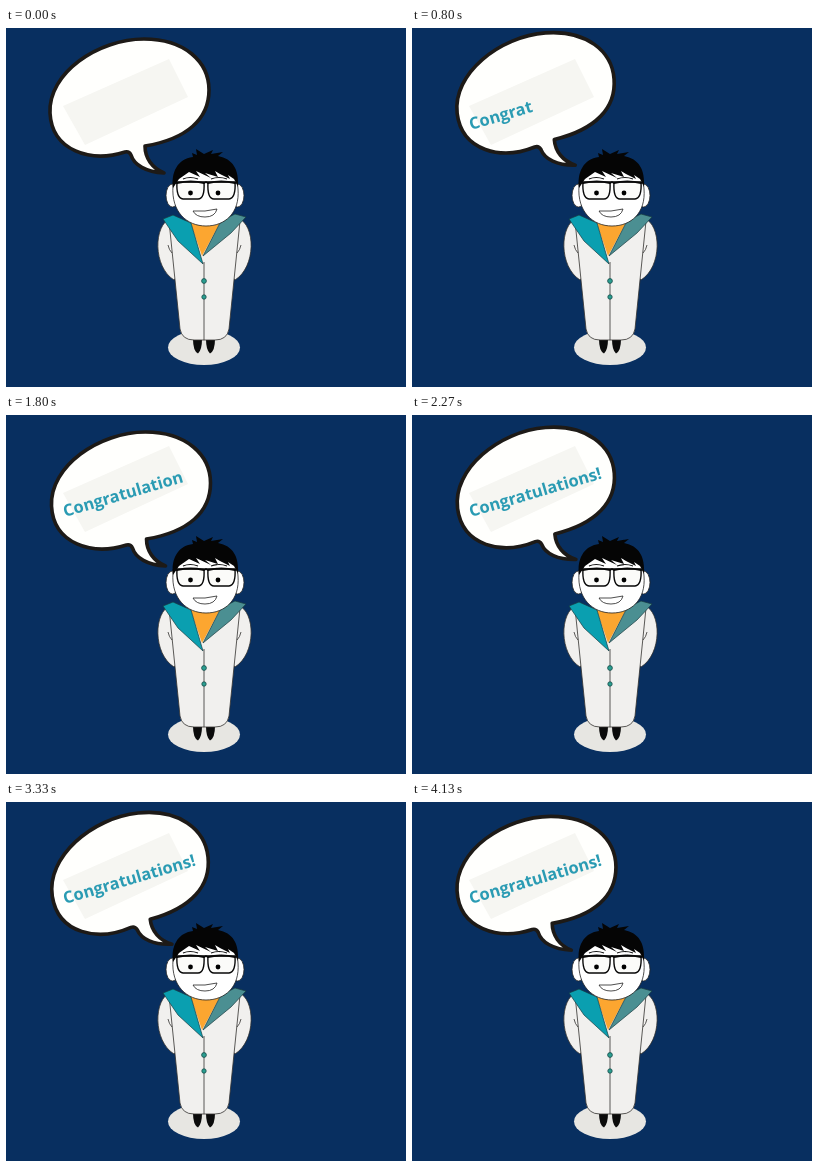
An HTML page for the animation above (4.19 s loop, 400 by 359 pixels).

```html
<!DOCTYPE html>
<html lang="en">
<head>
<meta charset="utf-8">
<title>Congratulations</title>
<style>
html, body { margin: 0; width: 100%; height: 100%; overflow: hidden; background: #082f60; }
svg { display: block; width: 100%; height: 100%; }
text { font: 700 16.5px "Open Sans", "Noto Sans", sans-serif; fill: #2a9bb3; }
.coat { fill: #f1f0ee; stroke: #33322f; stroke-width: .8; }
.skin { fill: #fff; stroke: #222; stroke-width: .8; }
.lapel { stroke: #173c40; stroke-width: .7; }
.line { fill: none; stroke: #33322f; stroke-width: .8; }
</style>
</head>
<body>
<svg viewBox="0 0 400 359">
  <rect width="400" height="359" fill="#082f60"/>

  <path id="bubble" d="M119 124C85 135 46 123 44 85C42 45 92 11 138 11C179 11 203 34 203 62C203 91 181 111 139 118C139 130 146 140 158 145C140 144 128 137 125 127Q123 123 119 124Z"
    fill="#fffffd" stroke="#1d1a17" stroke-width="3.6" stroke-linejoin="round"/>
  <path d="M57 78L163 31L182 69L79 117Z" fill="#f6f6f2"/>
  <text id="label" transform="translate(59 102) rotate(-16.4)"></text>

  <g id="man">
    <ellipse cx="198" cy="319.500" rx="36" ry="17.500" fill="#e7e6e2"/>
    <path d="M187 311H196Q196 322 192 325.500Q187 323 187 311ZM200 311H209Q209 323 204 325.500Q200 322 200 311Z" fill="#0b0b0b"/>
    <path class="coat" d="M165 190C147 197 147 239 168 252L178 240V195ZM232 190C250 197 250 239 229 252L219 240V195Z"/>
    <path class="coat" d="M163 193L174 301Q176 312 188 312H209Q221 312 223 301L234 193Z"/>
    <path class="line" d="M198 234V312M162 217Q163 222 166 225M235 217Q234 222 231 225"/>
    <path d="M184 193H215L196 228Z" fill="#fca630"/>
    <path class="lapel" d="M215 193L229 186L240 189L225 205L197 228Z" fill="#4b8f92"/>
    <path class="lapel" d="M157 191L167 187L185 195L197 236L172 213Z" fill="#0a9fb0"/>
    <g fill="#2b9f91" stroke="#164b48" stroke-width=".8">
      <circle cx="198" cy="253" r="2.400"/>
      <circle cx="198" cy="269" r="2.200"/>
    </g>

    <ellipse class="skin" cx="166.500" cy="167.500" rx="6.500" ry="11.500"/>
    <ellipse class="skin" cx="231.500" cy="167.500" rx="6.500" ry="11.500"/>
    <path class="skin" d="M167 158C168 138 182 133 200 133C219 133 231 142 232 161C234 185 219 198 200 198C181 198 165 184 167 158Z"/>
    <path d="M167 160C165 145 171 131 187 129L186 125L191 127L190 121L198 126L207 122L205 126L217 124L212 128C227 131 233 141 232 159L228 151L222 147L224 151L214 146L209 143L212 149L199 145L205 150L190 143L194 149L183 144L173 151Z" fill="#050505"/>
    <path d="M177 151Q184 148 192 151M205 151Q213 148 221 151" fill="none" stroke="#111" stroke-width="1.200"/>
    <g fill="#fbfbf9" stroke="#080808" stroke-width="1.400">
      <path d="M171 154H198Q199 171 192 171H177Q170 170 171 154ZM202 154H229Q230 170 223 171H208Q201 171 202 154Z"/>
      <path d="M167 154L171 155Q185 152 198 155Q200 153 202 155Q215 152 229 155L232 154" fill="none" stroke-width="1.800"/>
    </g>
    <circle cx="184.500" cy="165" r="2.400"/>
    <circle cx="212" cy="165" r="2.400"/>
    <path class="skin" d="M187 183Q199 184 211 181Q209 189 199 189Q190 189 187 183Z"/>
  </g>
</svg>
<script>
const LOOP = 4190, STEP = 1000 / 15, CHAR_TIME = 130;
const MESSAGE = "Congratulations!";
const bubble = document.getElementById("bubble");
const label = document.getElementById("label");

// time, shift x, shift y, turn in degrees
const SWAY = [
  [0, 0, 0, 0],
  [470, 0, -3.5, -3.3],
  [835, 0, -5.2, -4.2],
  [1200, 0, -3.4, -4],
  [1800, 1.5, 6, 0],
  [2270, .3, 2.4, -4.5],
  [2830, 0, -4.8, -5.5],
  [3330, .5, 1.2, -6],
  [3800, 1, 4.8, -2.5],
  [4130, 1, 3.5, -.3]
];

// key by index, continued before and after the loop
function keyAt(i) {
  const n = SWAY.length, [time, ...pose] = SWAY[(i + n) % n];
  return [time + Math.floor(i / n) * LOOP, ...pose];
}

// smooth curve through the keys, without stopping at them
function swayAt(t) {
  const i = SWAY.findLastIndex(key => key[0] <= t);
  const [a, b, c, d] = [-1, 0, 1, 2].map(k => keyAt(i + k));
  const span = c[0] - b[0], u = (t - b[0]) / span;
  const ease = u * u * (3 - 2 * u);
  return [1, 2, 3].map(k => {
    const leave = (c[k] - a[k]) / (c[0] - a[0]) * span;
    const arrive = (d[k] - b[k]) / (d[0] - b[0]) * span;
    return b[k] + (c[k] - b[k]) * ease + u * (1 - u) * (leave * (1 - u) - arrive * u);
  });
}

function render(time) {
  const t = Math.floor((time % LOOP + 5) / STEP) * STEP;
  const [x, y, turn] = swayAt(t);
  bubble.setAttribute("transform", `translate(${x} ${y}) rotate(${turn} 123 72)`);
  label.textContent = MESSAGE.slice(0, Math.ceil(t / CHAR_TIME));
}

const start = performance.now();
function tick() {
  render(performance.now() - start);
  requestAnimationFrame(tick);
}
tick();
</script>
</body>
</html>
```
